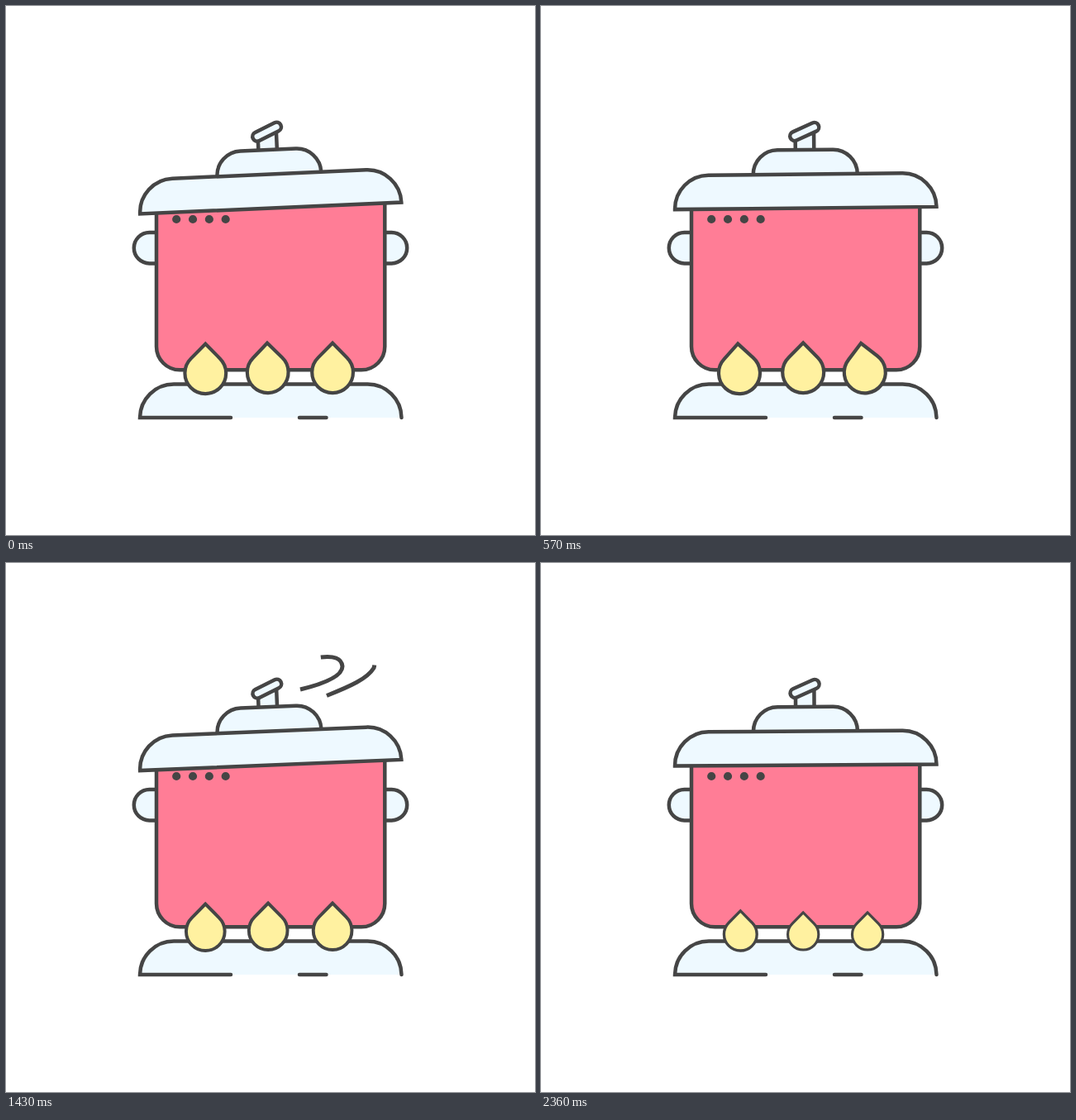
An HTML page that plays this animation: 640 px wide and 640 px high, repeating every 2.43 s.

```html
<!DOCTYPE html>
<html lang="en">
<head>
<meta charset="utf-8">
<title>Boiling pot</title>
<style>
  html, body { margin: 0; width: 100%; height: 100%; overflow: hidden; background: #fff; }
  svg { display: block; width: 100%; height: 100%; }
  .line { stroke: #454545; stroke-width: 4.5; fill: none; }
  .pale { fill: #eef9ff; }
  .body { fill: #ff7d96; }
  .flame { fill: #fff1a0; stroke-width: 4.2; }
  .steam { stroke-width: 5; }
  .round { stroke-linecap: round; }
  .dots { stroke: #454545; stroke-width: 10.2; stroke-linecap: round; stroke-dasharray: 0 19.83; }
</style>
</head>
<body>
<svg viewBox="0 0 640 640">
  <defs>
    <path id="drop" d="M0 -60.5L-17.5 -42.8A25 25 0 1 0 17.5 -42.8Z"/>
  </defs>

  <g class="line pale">
    <path d="M184 274H173.500A18.700 18.700 0 0 0 173.500 311.400H184"/>
    <path d="M457 274H466.500A18.700 18.700 0 0 1 466.500 311.400H457"/>
  </g>
  <path class="line body" d="M182 226V412A28.300 28.300 0 0 0 210.300 440.300H430A28.300 28.300 0 0 0 458.300 412V226Z"/>
  <path class="dots" d="M206.200 258H266"/>

  <g id="lid" class="line pale">
    <path d="M308.500 174V154H331V174"/>
    <rect x="301" y="146.400" width="37.400" height="11.200" rx="5.600" transform="rotate(-24 319.700 152)"/>
    <path d="M257.200 203.500A29.500 29.500 0 0 1 286.700 174H353.700A29.500 29.500 0 0 1 383.200 203.500"/>
    <path d="M162 244.500A41 41 0 0 1 203 203.500H437.500A41 41 0 0 1 478.500 244.500Z"/>
  </g>

  <path class="line pale round" d="M478.500 498A41 41 0 0 0 437.500 457.500H203A41 41 0 0 0 162 498H272"/>
  <path class="line round" d="M355 498H387.500"/>

  <use class="line flame" href="#drop"/>
  <use class="line flame" href="#drop"/>
  <use class="line flame" href="#drop"/>

  <path class="line steam" pathLength="100" d="M356 153C385 146 407 137 407 125C406 115 396 112 380.500 114"/>
  <path class="line steam" pathLength="100" d="M388 160.500C417 149 437 140 445 127C449 114 437 109 417 114.500"/>
</svg>
<script>
  const LOOP = 2430, STEPS = 34, STEP = 1000 / 14;
  const WOBBLE = 360, PUFF = STEP * 17;

  const lid = document.getElementById('lid');
  const flameEls = document.querySelectorAll('.flame');
  const steamEls = document.querySelectorAll('.steam');

  // Each lean is a moment and the angle reached then.
  const flames = [
    { x: 241.3, y: 469, leans: [[571, -3], [1714, 11]] },
    { x: 317.2, y: 468, leans: [[214, -7]] },
    { x: 395.1, y: 468, leans: [[571, -7.6], [1714, 11]] }
  ];

  const ramp = (t, from, span) => Math.min(1, Math.max(0, (t - from) / span));
  const ease = u => u * u * (3 - 2 * u);
  const bump = (t, mid) => ease(1 - ramp(Math.abs(t - mid), 0, 4 * STEP));

  // The lid is kicked up quickly, then sinks back.
  function tilt(t) {
    const kick = 0.175, p = t % WOBBLE / WOBBLE;
    const lift = p < kick ? ease(p / kick) : 1 - ((p - kick) / (1 - kick)) ** 0.64;
    return -2.53 + 5.43 * lift;
  }

  // Flames burn low late in the loop and recover one after another.
  function size(t, i) {
    const low = ease(ramp(t, 1143, 857)) - ease(ramp(t, 2286 + i * STEP, 250));
    return 1 - 0.255 * low - 0.03 * bump(t, 3 * STEP);
  }

  function draw(t) {
    lid.setAttribute('transform', `rotate(${tilt(t)} 320.3 244.5)`);

    flames.forEach(({ x, y, leans }, i) => {
      const angle = leans.reduce((sum, [mid, peak]) => sum + peak * bump(t, mid), 0);
      flameEls[i].setAttribute('transform',
        `translate(${x} ${y}) rotate(${angle}) scale(${size(t, i)})`);
    });

    steamEls.forEach((el, i) => {
      const age = t % PUFF - i * STEP;
      const from = 100 * ramp(age, 215, 240);
      const to = 100 * ramp(age, 0, 215);
      el.style.visibility = to > from ? 'visible' : 'hidden';
      el.style.strokeDasharray = `0 ${from} ${to - from} 200`;
    });
  }

  // The motion runs at 14 pictures a second.
  const start = performance.now();
  function tick() {
    const now = (performance.now() - start) % LOOP;
    draw(Math.floor((now + 4.5) * STEPS / LOOP) % STEPS * STEP);
    requestAnimationFrame(tick);
  }
  tick();
</script>
</body>
</html>
```
